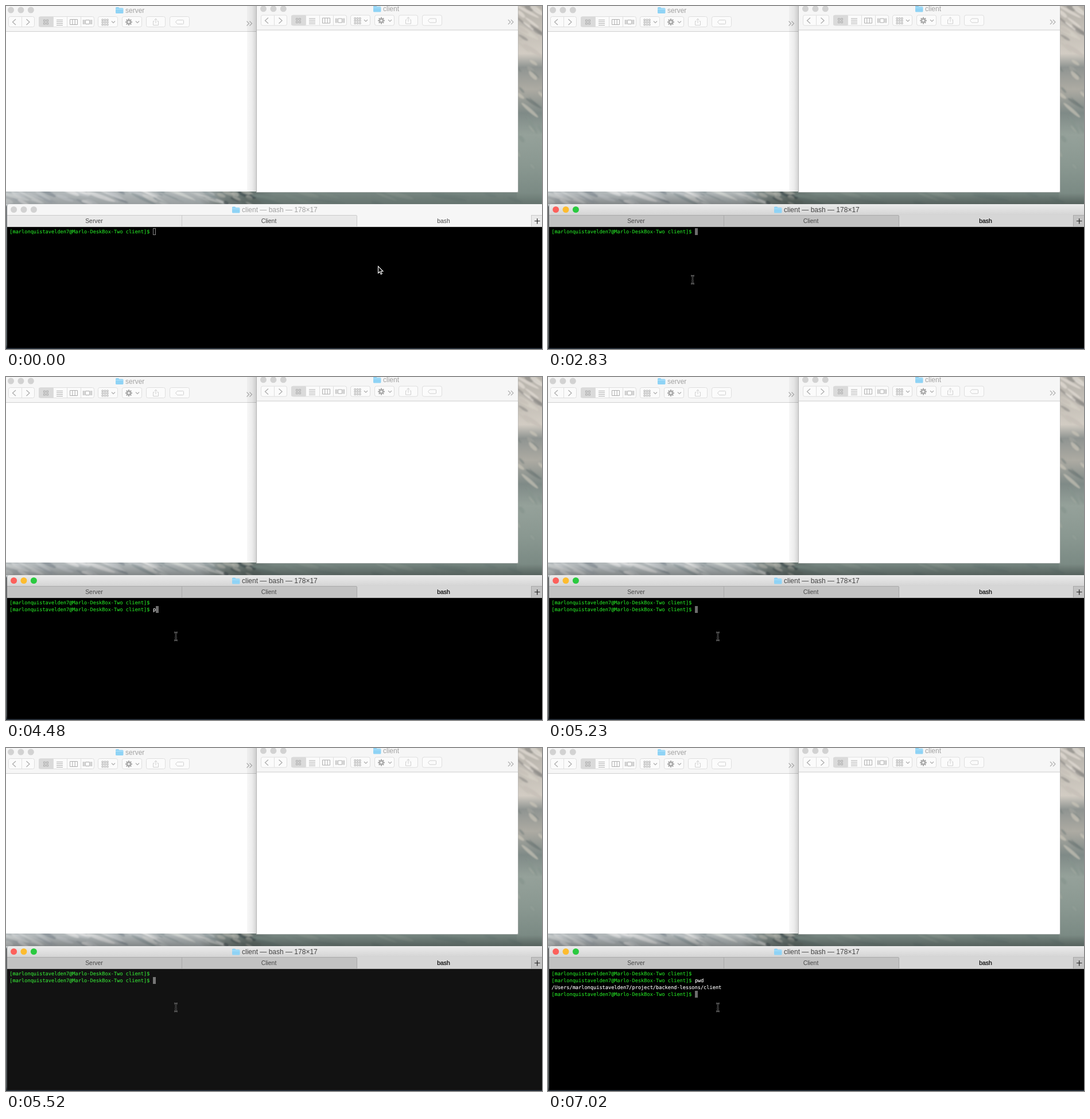
These frames come from a looping animation (934 px wide and 599 px high, 8 s). An HTML page:

```html
<!DOCTYPE html>
<html lang="en">
<head>
<meta charset="utf-8">
<title>Terminal session</title>
<style>
  html, body { margin: 0; width: 100%; height: 100%; overflow: hidden; background: #75857f; }
  svg { display: block; width: 934px; height: 599px; }
  text { font-family: "Liberation Sans", Arial, sans-serif; white-space: pre; }
  .title { font-size: 12px; fill: #a2a2a2; }
  .tab { font-size: 10.4px; fill: #484848; text-anchor: middle; }
  .mono text { font: 8.64px "DejaVu Sans Mono", monospace; text-rendering: geometricPrecision; stroke-width: .15; }
  .prompt { fill: #24d824; stroke: #24d824; }
  .output { fill: #fff; stroke: #fff; }
  .button { fill: #fbfbfb; stroke: #dedede; }
  .icon { fill: none; stroke: #adadad; }
  .faint { fill: none; stroke: #d0d0d0; }
</style>
</head>
<body>
<svg id="stage" viewBox="0 0 934 599" xmlns="http://www.w3.org/2000/svg"></svg>
<script>
const LOOP = 8000;
const FOCUS = 1500, ENTER = 3730, RESULT = 7020;
const USER = 'marlonquistavelden7';
const PROMPT = `[${USER}@Marlo-DeskBox-Two client]$ `;
const OUTPUT = `/Users/${USER}/project/backend-lessons/client`;
const LEFT = 6.3, COLUMN = 5.2, TOP = 388, LINE = 12.1;

// Each step holds until the next one starts.
const TYPING = [[0, ''], [4480, 'p'], [4630, 'pwd'], [4930, 'pw'], [5080, 'p'], [5230, ''],
  [5670, 'pw'], [5970, 'pwd'], [RESULT, '']];
const FLASH = [[0, 0], [5370, .212], [5520, .072], [5670, 0]];
const POINTER = [[0, [648, 454]], [2090, [581, 432]], [2240, [563, 424]], [2830, [252, 478]],
  [2980, [277, 457]], [3130, [296, 453]]];
const BEAM_FROM = 2090;

const at = (steps, t) => steps.findLast(([start]) => t >= start)[1];

const rect = (x, y, w, h, attrs = '') =>
  `<rect x="${x}" y="${y}" width="${w}" height="${h}" ${attrs}/>`;
const path = (d, attrs = '') => `<path d="${d}" ${attrs}/>`;
const label = (x, y, text, attrs) => `<text x="${x}" y="${y}" ${attrs}>${text}</text>`;
const gradient = (id, vertical, stops) =>
  `<linearGradient id="${id}" x2="${vertical ? 0 : 1}" y2="${vertical ? 1 : 0}">` +
  stops.map(([offset, color, alpha = 1]) =>
    `<stop offset="${offset}" stop-color="${color}" stop-opacity="${alpha}"/>`).join('') +
  '</linearGradient>';

function randomizer(seed) {
  return () => (seed = (seed * 16807) % 2147483647) / 2147483647;
}

function streaks(seed, count, [x, y, w, h], angle, length, colors) {
  const random = randomizer(seed);
  return Array.from({ length: count }, () => {
    const cx = x + random() * w, cy = y + random() * h;
    const rx = length * (.4 + random()), ry = 1 + random() * 3;
    const color = colors[Math.floor(random() * colors.length)];
    const turn = angle + random() * 16 - 8;
    return `<ellipse rx="${rx}" ry="${ry}" fill="${color}" opacity=".65"
      transform="translate(${cx} ${cy}) rotate(${turn})"/>`;
  }).join('');
}

function wallpaper() {
  return rect(0, 346, 934, 253, 'fill="url(#ground)"') +
    rect(0, 320, 934, 28, 'fill="url(#valley)"') +
    rect(890, 0, 44, 346, 'fill="url(#hills)"') +
    '<g filter="url(#soft)">' +
    streaks(31, 22, [892, 0, 42, 88], 36, 18, ['#e6e1d9', '#d5cfc5', '#c3beb5', '#efebe4', '#8f8d89']) +
    streaks(77, 12, [892, 98, 42, 85], 40, 14, ['#7c8583', '#a3a59e', '#cbc6ba', '#6c7675']) +
    streaks(12, 7, [892, 200, 42, 100], 55, 14, ['#93a098', '#a0a89e', '#86948d']) +
    streaks(45, 34, [0, 322, 260, 24], 22, 20, ['#e6e7e6', '#c5cacc', '#808b92', '#a3abb0', '#d6d9d9']) +
    streaks(58, 20, [240, 322, 140, 24], 22, 20, ['#d5d7d5', '#b0b8ba', '#bdc2c2', '#8b979a']) +
    streaks(93, 14, [375, 326, 65, 20], 22, 12, ['#4b5759', '#67726e', '#b3b5ae', '#3e4b4e']) +
    streaks(64, 14, [445, 324, 445, 22], 14, 24, ['#6b7c79', '#7c8c86', '#84918b']) +
    '</g>';
}

const lights = (x, y, colors) => colors.map((color, i) =>
  `<circle cx="${x + i * 17.4}" cy="${y}" r="5.5" fill="${color}"/>`).join('');
const GREY = Array(3).fill('#d2d2d2');

const folder = (x, y) =>
  path(`M${x} ${y + 1.5}q0-1.5 1.5-1.5h3.5l1.5 1.5h5.5q1.5 0 1.5 1.5v6.5q0 1.5-1.5 1.5h-10.5q-1.5 0-1.5-1.5z`, 'fill="#8fd3f5"') +
  path(`M${x} ${y + 3.5}h13.5`, 'stroke="#b5e4fb" fill="none"');

const grid = (x, y, columns, rows, step, size) => {
  let d = '';
  for (let r = 0; r < rows; r++)
    for (let c = 0; c < columns; c++)
      d += `M${x + c * step} ${y + r * step}h${size}v${size}h${-size}z`;
  return d;
};

function toolbar() {
  const button = (x, w) => rect(x + .5, 18.5, w, 18, 'rx="3" class="button"');
  const down = x => path(`M${x} 26.5l3 3 3-3`, 'class="icon" stroke-width="1.2"');
  const spokes = Array.from({ length: 8 }, (_, i) =>
    path('M0-3.5V-6', `stroke="#a6a6a6" stroke-width="2" transform="translate(214 28) rotate(${i * 45})"`)).join('');
  return button(4, 45) + button(57, 96) + button(160, 34) + button(202, 34) + button(244, 33) + button(285, 34) +
    path('M57 21q0-2.5 2.5-2.5H82V36.5H59.5q-2.5 0-2.5-2.5z', 'fill="#dadada"') +
    path('M27.5 19v17M82.5 19v17M106.5 19v17M130.5 19v17', 'stroke="#dedede"') +
    path('M17 23l-5.5 5 5.5 5M35.5 23l5.5 5-5.5 5', 'class="icon" stroke-width="1.3"') +
    path(grid(65.5, 24, 2, 2, 5, 3), 'class="icon"') +
    path('M88 24.5h11M88 27.5h11M88 30.5h11M88 33.5h11', 'class="icon"') +
    path('M111.5 23.5h13v9h-13zM115.8 23.5v9M120.2 23.5v9', 'class="icon"') +
    path('M138.5 24.5h7v7h-7zM134.5 24v8M136.5 24v8M147.5 24v8M149.5 24v8', 'class="icon"') +
    path(grid(167, 23, 3, 1, 4.3, 2.5) + grid(167, 27, 3, 2, 4.3, 2.5), 'class="icon" stroke-width=".9"') +
    down(184) + down(226) +
    '<circle cx="214" cy="28" r="3.1" class="icon" stroke-width="2.6"/>' + spokes +
    path('M258.5 26.5h-2v7h9v-7h-2M261 30v-8M258.5 24.5l2.5-2.5 2.5 2.5', 'class="faint"') +
    path('M298.5 24.5h10q1 0 1 1v5q0 1-1 1h-10l-3-3.5z', 'class="faint"');
}

const overflow = (x, y) =>
  path(`M${x} ${y - 4}l4 4-4 4M${x + 5} ${y - 4}l4 4-4 4`, 'fill="none" stroke="#b0b0b0" stroke-width="1.2"');

function finders() {
  return rect(0, 0, 437, 324, 'fill="#fff"') +
    rect(0, 0, 437, 44, 'fill="#f6f6f6"') + rect(0, 44, 437, 1, 'fill="#cfcfcf"') +
    lights(8.5, 7, GREY) + folder(191, 2) + label(208, 11.5, 'server', 'class="title"') +
    toolbar() + overflow(419.5, 30.5) +
    rect(420, 0, 17, 324, 'fill="url(#fold)"') +
    rect(436, 0, 456.5, 325.5, 'fill="#b4b4b4"') +
    path('M437 0H892V323q0 2-2 2H437z', 'fill="#fff"') +
    rect(437, 0, 455, 42, 'fill="#f6f6f6"') + rect(437, 41.5, 455, 1, 'fill="#cdcdcd"') +
    lights(448.5, 4.8, GREY) + folder(640, -.5) + label(657, 9, 'client', 'class="title"') +
    `<g transform="translate(440 -2.5)">${toolbar()}</g>` + overflow(875, 28);
}

function chrome(focused) {
  const tabs = focused ? '#c2c2c2' : '#e9e9e9';
  const active = focused ? '#d6d6d6' : '#f6f6f6';
  const rule = focused ? '#a9a9a9' : '#cbcbcb';
  return rect(0, 327, 934, 19, `fill="url(#drop)" opacity="${focused ? 1 : .5}"`) +
    rect(0, 350, 2, 249, `fill="#333" opacity="${focused ? .45 : .25}"`) +
    path('M2 366V351q0-5 5-5H934V366z', `fill="${focused ? 'url(#bar)' : '#f6f6f6'}"`) +
    rect(2, 365, 932, 21, `fill="${tabs}"`) + rect(611, 365, 304, 21, `fill="${active}"`) +
    path('M2 365.5H611M306.5 366v20M611.5 366v20M915.5 366v20M915 365.5h19M2 385.5H934', `stroke="${rule}"`) +
    lights(13.6, 355.5, focused ? ['#fc605b', '#fdbc2f', '#2aca3f'] : GREY) +
    folder(394, 350.5) +
    label(411, 360, 'client — bash — 178×17', `class="title" ${focused ? 'style="fill:#444"' : ''}`) +
    label(153.5, 379, 'Server', 'class="tab"') + label(458, 379, 'Client', 'class="tab"') +
    label(762.5, 379, 'bash', `class="tab" ${focused ? 'style="fill:#000;stroke:#000;stroke-width:.2"' : ''}`) +
    path('M921 375.5h9.5M925.7 371v9.5', 'stroke="#222" stroke-width="1.2"');
}

const line = (row, text, type, column = 0) =>
  label(LEFT + column * COLUMN, TOP + row * LINE + 9, text, `class="${type}"`);

function session(t) {
  const row = t < ENTER ? 0 : t < RESULT ? 1 : 3;
  const typed = at(TYPING, t);
  const width = PROMPT.length;
  const x = Math.round(LEFT + (width + typed.length) * COLUMN), y = Math.round(TOP + row * LINE);
  let out = line(0, PROMPT, 'prompt');
  if (row > 0) out += line(1, PROMPT, 'prompt') + line(1, row === 1 ? typed : 'pwd', 'output', width);
  if (row > 1) out += line(2, OUTPUT, 'output') + line(3, PROMPT, 'prompt');
  return out + (t < FOCUS
    ? rect(x + .5, y + .5, 4, 11, 'fill="none" stroke="#858585"')
    : rect(x, y, 5, 12, 'fill="#6c6c6c"'));
}

function pointer(t) {
  const [x, y] = at(POINTER, t);
  const beam = 'M-3-7Q0-7 0-4.5V4.5Q0 7-3 7M3-7Q0-7 0-4.5V4.5Q0 7 3 7M-1.5 2h3';
  const shape = t < BEAM_FROM
    ? path('M.5.5V12.5L3.3 10 5.3 14.5 7.3 13.6 5.3 9.3H9z', 'fill="#000" stroke="#fff" stroke-width="1.1"')
    : path(beam, 'fill="none" stroke="#808080" stroke-width="2.4"') +
      path(beam, 'fill="none" stroke="#111" stroke-width=".9"');
  return `<g transform="translate(${x} ${y})">${shape}</g>`;
}

document.getElementById('stage').innerHTML = '<defs>' +
  gradient('ground', true, [[0, '#92979a'], [.97, '#626b70'], [1, '#252f3c']]) +
  gradient('valley', false, [[0, '#b3b9bb'], [.36, '#b0b6b7'], [.41, '#7a8582'], [.46, '#66736f'],
    [.5, '#778681'], [1, '#74847e']]) +
  gradient('hills', true, [[0, '#b5b1aa'], [.24, '#d2ccc3'], [.31, '#8f9491'], [.42, '#adaba3'],
    [.54, '#7f8a87'], [.65, '#95a19a'], [.8, '#8a9891'], [1, '#75857f']]) +
  gradient('fold', false, [[0, '#000', .03], [.5, '#000', .07], [1, '#000', .18]]) +
  gradient('drop', true, [[0, '#000', 0], [1, '#000', .26]]) +
  gradient('bar', true, [[0, '#ebebeb'], [1, '#d3d3d3']]) +
  '<filter id="soft" x="-5%" y="-5%" width="110%" height="110%"><feGaussianBlur stdDeviation="1"/></filter></defs>' +
  wallpaper() + finders() +
  '<g id="chrome"></g>' + rect(2, 386, 932, 211.5, 'fill="#000"') +
  '<g id="session" class="mono"></g>' +
  rect(2, 386, 932, 211.5, 'id="flash" fill="#fff" opacity="0"') + '<g id="pointer"></g>';

const part = id => document.getElementById(id);
const shown = {};
function update(id, markup) {
  if (shown[id] !== markup) part(id).innerHTML = shown[id] = markup;
}

function render(t) {
  update('chrome', chrome(t >= FOCUS));
  update('session', session(t));
  update('pointer', pointer(t));
  part('flash').setAttribute('opacity', at(FLASH, t));
}

const start = performance.now();
function tick() {
  render((performance.now() - start) % LOOP);
  requestAnimationFrame(tick);
}
tick();
</script>
</body>
</html>
```
